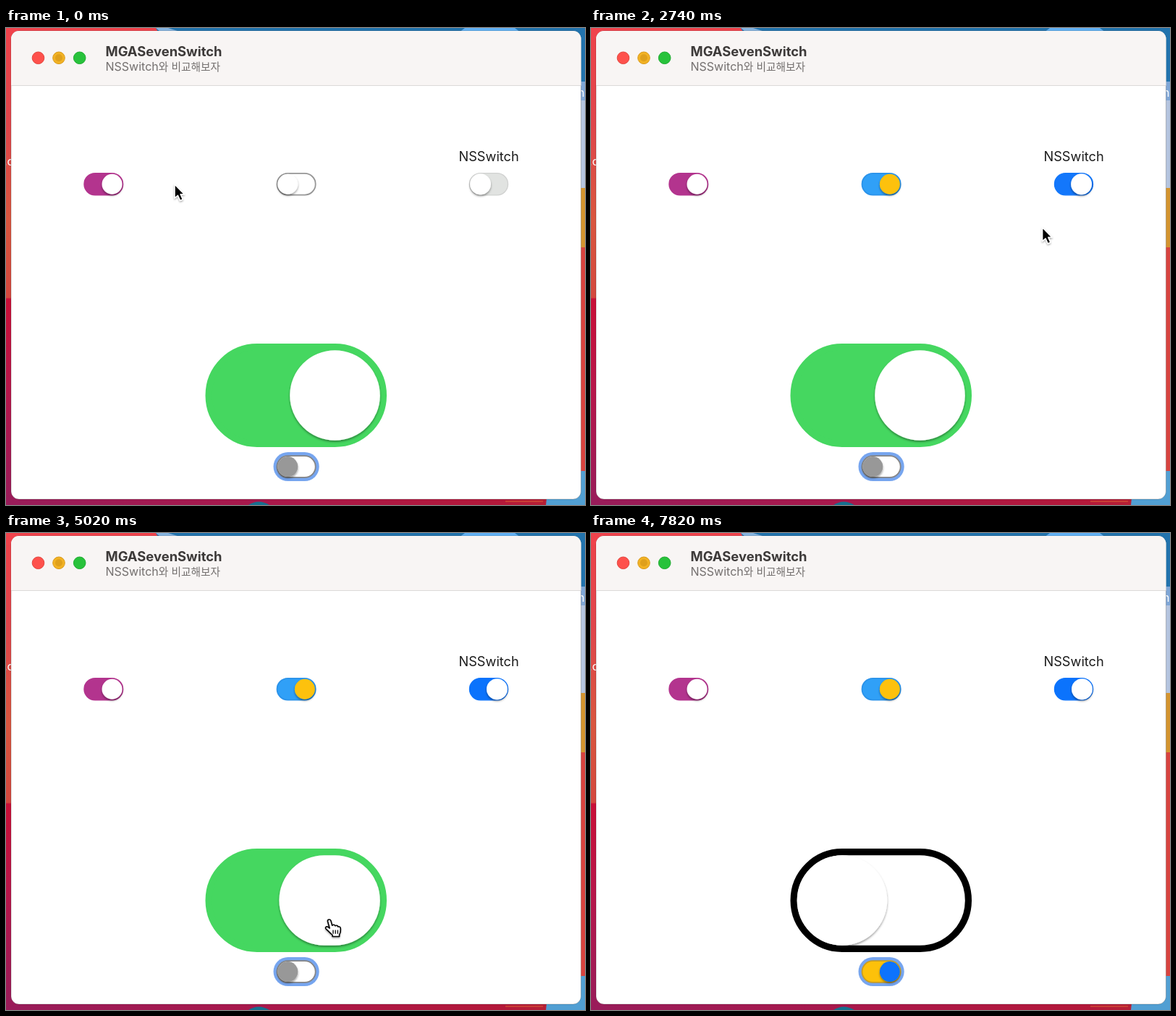
Animation, 800 px wide and 659 px high, one loop 7840 ms. Source, as an HTML page:

```html
<!DOCTYPE html>
<html lang="ko">
<head>
<meta charset="utf-8">
<style>
  html, body { margin: 0; width: 100%; height: 100%; overflow: hidden; }
  svg { display: block; width: 800px; height: 659px; }
  text { font-family: Inter, "Noto Sans CJK KR", "Noto Sans CJK", sans-serif; }
</style>
</head>
<body>
<svg id="stage" viewBox="0 0 800 659" xmlns="http://www.w3.org/2000/svg">
  <defs>
    <linearGradient id="leftEdge" x1="0" y1="0" x2="0" y2="1">
      <stop offset="0" stop-color="#ee434b"/>
      <stop offset=".2" stop-color="#e0454b"/>
      <stop offset=".4" stop-color="#d9563f"/>
      <stop offset=".565" stop-color="#d4483e"/>
      <stop offset=".568" stop-color="#c90f37"/>
      <stop offset=".75" stop-color="#b8164a"/>
      <stop offset="1" stop-color="#981c5a"/>
    </linearGradient>
    <linearGradient id="bottomEdge">
      <stop offset="0" stop-color="#981c5a"/>
      <stop offset=".45" stop-color="#a9184b"/>
      <stop offset=".85" stop-color="#b3183a"/>
      <stop offset="1" stop-color="#b72531"/>
    </linearGradient>
    <filter id="knobShadow" x="-30%" y="-30%" width="160%" height="170%">
      <feDropShadow dx="0" dy="2" stdDeviation="1.6" flood-color="#000" flood-opacity=".4"/>
    </filter>
    <filter id="cursorShadow" x="-50%" y="-50%" width="200%" height="200%">
      <feDropShadow dx="0" dy="1.5" stdDeviation="1.2" flood-color="#000" flood-opacity=".35"/>
    </filter>
  </defs>

  <!-- desktop behind the window -->
  <rect width="800" height="659" fill="url(#bottomEdge)"/>
  <rect width="20" height="659" fill="url(#leftEdge)"/>
  <rect width="212" height="16" fill="#f0434c"/>
  <path d="M207 0H800V76H780V16H216Z" fill="#2273ad"/>
  <path d="M207 0H224L240 5H213Z" fill="#86b4df"/>
  <path d="M634 0H703L711 6H626Z" fill="#62b1f4"/>
  <path d="M780 74H800V222H780Z" fill="#b4c4df"/>
  <path d="M780 74H800V100H780Z" fill="#7fa6d6"/>
  <path d="M780 221H800V303H780Z" fill="#d4942f"/>
  <path d="M780 303H800V612H780Z" fill="#d8433f"/>
  <path d="M748 640L790 612H800V659H746Z" fill="#519fd3"/>
  <path d="M335 659Q349 650 364 659Z" fill="#16708f"/>
  <path d="M690 654H742" stroke="#cf4a35" stroke-width="1.5"/>
  <text x="-3" y="190" font-size="16" fill="#fff">.c</text>
  <text x="790" y="95" font-size="16" fill="#fff">n</text>

  <!-- window -->
  <rect x="7" y="4" width="787.5" height="647" rx="11" fill="#fff" stroke="#000" stroke-opacity=".22"/>
  <path d="M7 79V15A11 11 0 0 1 18 4H783.5A11 11 0 0 1 794.5 15V79Z" fill="#f8f5f4"/>
  <path d="M7 79.5H794.5" stroke="#dcd9d8"/>
  <g stroke-width="1">
    <circle cx="44.5" cy="41.3" r="8.3" fill="#fe514c" stroke="#e2463f"/>
    <circle cx="73" cy="41.3" r="8.3" fill="#f2b224" stroke="#d99b1d"/>
    <circle cx="73" cy="41.3" r="5" fill="#dfa01c"/>
    <circle cx="101.7" cy="41.3" r="8.3" fill="#28c23b" stroke="#1fab30"/>
  </g>
  <text x="137.5" y="38.5" font-size="18.4" font-weight="700" fill="#3d3a39">MGASevenSwitch</text>
  <text x="137.5" y="58.5" font-size="16" fill="#74706f">NSSwitch<tspan font-size="14.7">와 비교해보자</tspan></text>
  <text x="625.5" y="184" font-size="18.2" fill="#1d1d1d">NSSwitch</text>
  <rect x="369.5" y="586" width="63.2" height="40" rx="20" fill="#76a5ef"/>

  <g id="switches"></g>

  <g id="arrow" filter="url(#cursorShadow)">
    <path d="M0 0V19L4.4 15.2L7.6 22.4L11.2 20.8L8.1 13.8H13.4Z" fill="#000" stroke="#fff" stroke-width="1.5" stroke-linejoin="round"/>
  </g>
  <g id="hand" filter="url(#cursorShadow)">
    <path d="M-2.6 2.2C-2.6 -.6 1.1 -.8 1.9 1.8L3.7 8.2C5 6.6 7.3 7 7.8 8.8C9.4 7.6 11.3 8.3 11.7 10C13.6 9.2 15 10.3 15.2 12.2C15.6 15.6 15.2 18 13.6 20.8V23.5H4.1V21.5C1 19 -1.2 16.2 -4.3 13.6C-6.8 11.4 -4.9 9 -2.3 10.2L.2 12Z" fill="#fff" stroke="#000" stroke-width="1.6" stroke-linejoin="round"/>
    <path d="M5 14.5V19.8M8.2 14.5V19.8M11.4 14.5V19.8" stroke="#000" stroke-width="1.3" fill="none"/>
  </g>
</svg>
<script>
const LOOP = 7840;
const byId = id => document.getElementById(id);
const smooth = u => (u = Math.min(1, Math.max(0, u)), u * u * (3 - 2 * u));
const lerp = (a, b, u) => a + (b - a) * u;
const mix = (a, b, u) => `rgb(${a.map((v, i) => Math.round(lerp(v, b[i], u)))})`;
const rgb = hex => [1, 3, 5].map(i => parseInt(hex.slice(i, i + 2), 16));
const blend = (a, b, u) => mix(rgb(a), rgb(b), u);

// Starts at `initial`, then flips between 0 and 1 at each given time.
function flips(initial, times, duration = 300) {
  return t => times.reduce((value, start, i) => {
    const sign = (i + initial) % 2 ? -1 : 1;
    return value + sign * smooth((t - start) / duration);
  }, initial);
}

function addRect(attrs) {
  const node = document.createElementNS('http://www.w3.org/2000/svg', 'rect');
  set(node, attrs);
  byId('switches').append(node);
  return node;
}

function set(node, attrs) {
  for (const key in attrs) node.setAttribute(key, attrs[key]);
}

function makeSwitch({ x, y, w, h, border, gap = border, stretch = 1.2, off, active = off, on, on2 = on,
                      edgeOff, knobOff = '#ffffff', knobOn = knobOff, isOn, isPressed = () => 0 }) {
  const track = addRect({
    x: x + border / 2, y: y + border / 2, width: w - border, height: h - border,
    rx: (h - border) / 2, 'stroke-width': border
  });
  const size = h - 2 * gap;
  const knob = addRect({ y: y + gap, height: size, rx: size / 2, filter: 'url(#knobShadow)' });
  return t => {
    const state = isOn(t), press = isPressed(t);
    const width = size * lerp(1, stretch, press);
    const rest = rgb(off).map((v, i) => lerp(v, rgb(active)[i], press));
    set(track, { fill: mix(rest, rgb(on), state), stroke: blend(edgeOff, on2, state) });
    set(knob, { x: lerp(x + gap, x + w - gap - width, state), width, fill: blend(knobOff, knobOn, state) });
  };
}

const small = { w: 55, h: 31.5, border: 1.8 };
const switches = [
  makeSwitch({ ...small, x: 107.3, y: 200, off: '#ffffff', on: '#b3348e', edgeOff: '#999999', isOn: () => 1 }),
  makeSwitch({ ...small, x: 373.6, y: 200, off: '#ffffff', active: '#e1e3e1', on: '#30a0f7', on2: '#2b93ea',
    edgeOff: '#969696', knobOn: '#fdc10a', isOn: flips(0, [960]), isPressed: flips(0, [800, 960]) }),
  makeSwitch({ ...small, x: 639.8, y: 200, w: 54.4, border: 1.3, off: '#e1e3e1', on: '#0b73fc',
    edgeOff: '#d0d1d0', isOn: flips(0, [2450], 330) }),
  makeSwitch({ x: 275.5, y: 436, w: 250.5, h: 143, border: 9.2, off: '#ffffff', active: '#e1e3e1',
    on: '#45d760', edgeOff: '#000000', isOn: flips(1, [3600, 4450, 6900]),
    isPressed: flips(0, [3250, 4890, 6600, 7200]) }),
  makeSwitch({ ...small, x: 373.6, y: 590.3, off: '#ffffff', active: '#e1e3e1', on: '#fdc10a', on2: '#c99d22',
    edgeOff: '#858585', knobOff: '#989898', knobOn: '#0d73fd',
    isOn: flips(0, [5800]), isPressed: flips(0, [5660, 5800]) })
];

const path = [
  [0, 233, 216], [150, 233, 216], [750, 398, 214], [1050, 398, 214], [1620, 722, 206], [1800, 722, 206],
  [2250, 667, 216], [2570, 667, 216], [3150, 460, 500], [3400, 460, 505], [3940, 240, 531],
  [4150, 240, 531], [4600, 447, 534], [5180, 447, 534], [5560, 410, 602], [5860, 410, 602],
  [6250, 465, 514], [6650, 465, 514], [7100, 290, 522], [7250, 290, 522], [7600, -40, 560], [LOOP, -40, 560]
];

function cursorAt(t) {
  const i = Math.max(1, path.findIndex(p => p[0] >= t));
  const [t0, x0, y0] = path[i - 1], [t1, x1, y1] = path[i];
  const u = smooth((t - t0) / (t1 - t0));
  return [lerp(x0, x1, u), lerp(y0, y1, u)];
}

const clickable = [[374, 200, 429, 232], [275, 436, 526, 579], [374, 590, 429, 622]];
const drags = [[3250, 4890], [6600, 7200]];

function draw(t) {
  switches.forEach(update => update(t));
  const [x, y] = cursorAt(t);
  const pointing = drags.some(([a, b]) => t >= a && t < b) ||
    clickable.some(([l, top, r, b]) => x >= l && x <= r && y >= top && y <= b);
  const move = `translate(${x} ${y})`;
  set(byId('arrow'), { transform: move, visibility: pointing ? 'hidden' : 'visible' });
  set(byId('hand'), { transform: move, visibility: pointing ? 'visible' : 'hidden' });
}

const began = performance.now();
function tick() {
  draw((performance.now() - began) % LOOP);
  requestAnimationFrame(tick);
}
tick();
</script>
</body>
</html>
```
